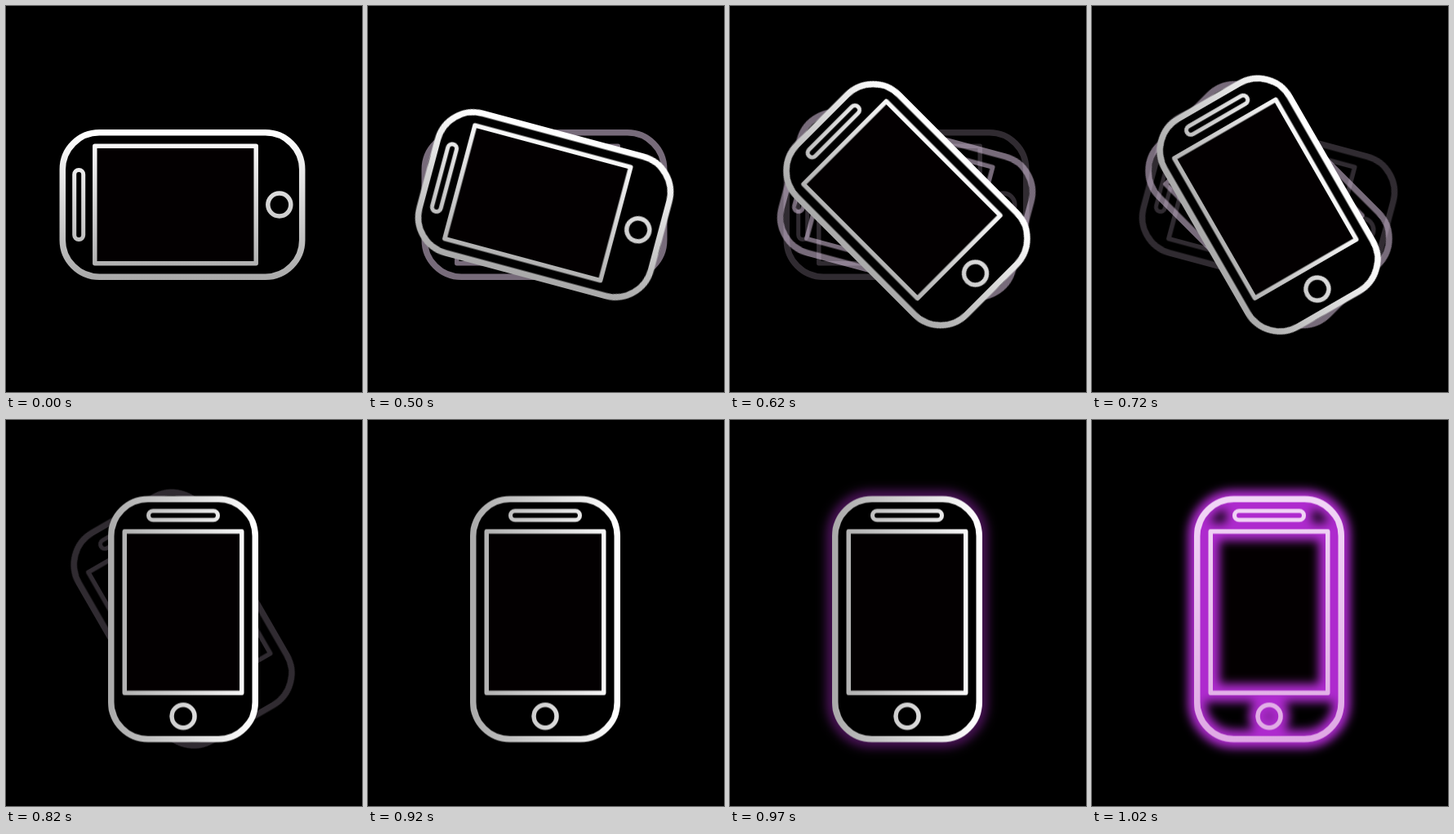
An HTML page without scripts that plays this animation: 436x472 px, repeating every 2020 ms.

```html
<!DOCTYPE html>
<html lang="en">
<head>
<meta charset="utf-8">
<title>Rotating phone</title>
<style>
html, body { margin: 0; width: 100%; height: 100%; overflow: hidden; background: #000; }
svg { display: block; width: 436px; height: 472px; }

.phone, .trail, .halo, .neon { animation: 2020ms step-end infinite; }
.trail { fill: none; stroke: #efd6f4; opacity: 0; }
.glow { fill: none; stroke: #ae2ace; filter: url(#soft); }
.halo, .neon { opacity: 0; }

.phone { animation-name: turn; }
.t0 { animation-name: fade0; }
.t15 { animation-name: fade15; }
.t45 { animation-name: fade45; }
.t60 { animation-name: fade60; }
.halo { animation-name: halo; }
.neon { animation-name: neon; }

@keyframes turn {
  0% { transform: translate(216px, 243px); }
  24.7525% { transform: translate(216px, 243px) rotate(15deg); }
  30.6931% { transform: translate(216.5px, 243px) rotate(45deg); }
  35.6436% { transform: translate(216.5px, 243.2px) rotate(60deg); }
  40.5941%, 100% { transform: translate(217px, 243.5px) rotate(90deg); }
}
@keyframes fade0 {
  0% { opacity: 0; }
  24.7525% { opacity: .5; }
  30.6931% { opacity: .2; }
  35.6436%, 100% { opacity: 0; }
}
@keyframes fade15 {
  0% { opacity: 0; }
  30.6931% { opacity: .5; }
  35.6436% { opacity: .2; }
  40.5941%, 100% { opacity: 0; }
}
@keyframes fade45 {
  0% { opacity: 0; }
  35.6436% { opacity: .5; }
  40.5941%, 100% { opacity: 0; }
}
@keyframes fade60 {
  0% { opacity: 0; }
  40.5941% { opacity: .2; }
  45.5446%, 100% { opacity: 0; }
}
@keyframes halo {
  0% { opacity: 0; }
  48.0198% { opacity: .4; }
  50.495%, 100% { opacity: 0; }
}
@keyframes neon {
  0% { opacity: 0; }
  50.495%, 100% { opacity: 1; }
}
</style>
</head>
<body>
<svg viewBox="0 0 436 472" role="img" aria-label="Phone turning upright and lighting up">
  <defs>
    <linearGradient id="silver" gradientUnits="userSpaceOnUse" x1="0" y1="-88" x2="0" y2="92">
      <stop offset="0" stop-color="#fff"/>
      <stop offset="1" stop-color="#a9a9a9"/>
    </linearGradient>
    <linearGradient id="pink" gradientUnits="userSpaceOnUse" x1="-150" y1="0" x2="150" y2="0">
      <stop offset="0" stop-color="#f1d6f6"/>
      <stop offset="1" stop-color="#dfa8e4"/>
    </linearGradient>
    <filter id="soft" filterUnits="userSpaceOnUse" x="-200" y="-150" width="400" height="300" color-interpolation-filters="sRGB">
      <feGaussianBlur stdDeviation="6"/>
    </filter>

    <rect id="body" x="-146.7" y="-88.2" width="293.4" height="176.4" rx="45"/>
    <rect id="screen" x="-107.2" y="-71.8" width="197.4" height="143.6" stroke-linejoin="round"/>
    <rect id="slot" x="-132.3" y="-42.5" width="11" height="85" rx="5.5"/>
    <circle id="home" cx="118.8" r="14"/>

    <g id="lines">
      <use href="#body" stroke-width="7.5"/>
      <use href="#screen" stroke-width="5.5"/>
      <use href="#slot" stroke-width="5"/>
      <use href="#home" stroke-width="5.5"/>
    </g>
    <g id="wide" stroke-width="22">
      <use href="#body"/>
      <use href="#screen"/>
      <use href="#slot"/>
      <use href="#home"/>
    </g>
  </defs>

  <rect width="436" height="472"/>

  <g class="trail t0"><use href="#lines" transform="translate(216 243)"/></g>
  <g class="trail t15"><use href="#lines" transform="translate(216 243) rotate(15)"/></g>
  <g class="trail t45"><use href="#lines" transform="translate(216.5 243) rotate(45)"/></g>
  <g class="trail t60"><use href="#lines" transform="translate(216.5 243.2) rotate(60)"/></g>

  <g class="phone">
    <g class="halo"><use class="glow" href="#wide"/></g>
    <use href="#body" fill="#000"/>
    <use href="#screen" fill="#030001"/>
    <use href="#lines" fill="none" stroke="url(#silver)"/>
    <g class="neon">
      <use class="glow" href="#wide"/>
      <use href="#lines" fill="none" stroke="url(#pink)"/>
    </g>
  </g>
</svg>
</body>
</html>
```
